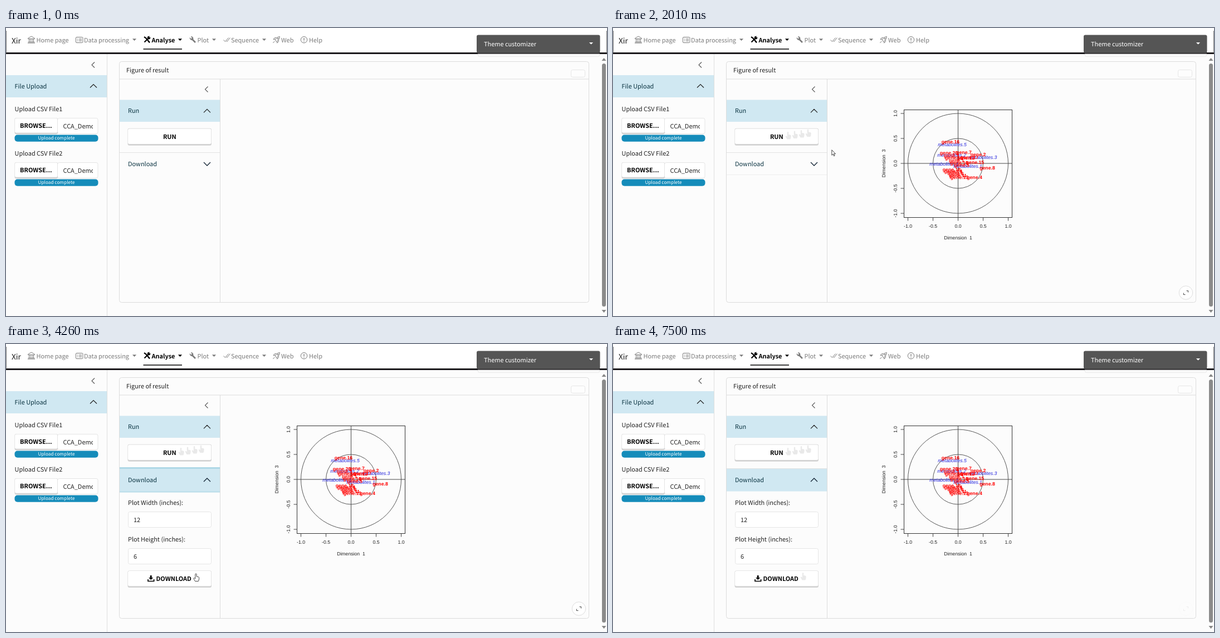
Recreate the animation shown at these times as an HTML page. Size 1079 by 519 pixels, loop 7.6 s.

```html
<!DOCTYPE html>
<html lang="en">
<head>
<meta charset="utf-8">
<title>Analysis dashboard</title>
<style>
  html, body { margin: 0; width: 100%; height: 100%; overflow: hidden; background: #fcfcfc; }
  svg { display: block; width: 1079px; height: 519px; }
  text {
    font: 10.95px "Noto Sans CJK SC", "Noto Sans CJK JP", "Noto Sans CJK", sans-serif;
    fill: #222; white-space: pre; text-rendering: geometricPrecision;
  }
  .bold { font-weight: 700; fill: #000; }
  .nav { fill: #7b7b7b; }
  .brand { font-size: 13.7px; }
  .light { fill: #fff; }
  .teal { fill: #0b3442; }
  .small { font-size: 8.25px; fill: #fff; }
  .mid { text-anchor: middle; }
  .plot text { font: 8.7px "Liberation Sans", Arial, sans-serif; text-anchor: middle; }
  .plot .gene { font-weight: 700; fill: #f00; }
  .plot .metabolites { font-style: italic; fill: #22d; }
</style>
</head>
<body>
<svg id="stage" viewBox="0 0 1079 519"></svg>
<script>
const LOOP = 7600;
const HAND = 'M-1.2 8V1.2a1.2 1.2 0 0 1 2.4 0V5l3 .6q1.6.4 1.5 2l-.4 3.4-1 2.5H-1.5L-4 9.2q-.7-1.2.4-1.6 1-.2 2.4 1.4z';
const ARROW = 'M0 0V9.5L2.2 7.5 3.8 11 5.3 10.3 3.7 7H6.7Z';
const BEAM = 'M-2 -5H-.6L0 -4.5L.6 -5H2M0 -4.5V4.5M-2 5H-.6L0 4.5L.6 5H2';

// Drawing helpers, each returning SVG markup
const text = (x, y, s, cls = '', more = '') => `<text x="${x}" y="${y}" class="${cls}" ${more}>${s}</text>`;
const rect = (x, y, w, h, fill, r = 0, stroke = 'none') =>
  `<rect x="${x}" y="${y}" width="${w}" height="${h}" rx="${r}" fill="${fill}" stroke="${stroke}"/>`;
const path = (d, stroke = '#333', width = 1, fill = 'none', more = '') =>
  `<path d="${d}" stroke="${stroke}" stroke-width="${width}" fill="${fill}" ${more}/>`;
const group = (id, content, more = '') => `<g id="${id}" ${more}>${content}</g>`;
const circle = (x, y, r, stroke, fill = 'none') => `<circle cx="${x}" cy="${y}" r="${r}" stroke="${stroke}" fill="${fill}"/>`;
const caret = (x, y, color) => path(`M${x - 3.6} ${y - 1.8}h7.2l-3.6 3.7z`, 'none', 0, color);
const chevronUp = (x, y) => path(`M${x - 6} ${y + 3}l6 -6 6 6`, '#222', 1.2);
const chevronLeft = (x, y) => path(`M${x + 2.5} ${y - 5}l-5 5 5 5`, '#555', 1.1);
const button = (x, y, w, h) =>
  rect(x, y, w, h, '#d3d3d3', 3) + rect(x + .6, y + .6, w - 1.2, h - 3.4, '#fff', 2.5);
const input = (y, value) => rect(219.5, y, 149, 28, '#fff', 3, '#e6e6e6') + text(229, y + 18.3, value);

function navigation() {
  const gray = '#7b7b7b';
  const item = (x, label, caretX) => text(x, 25.5, label, 'nav') + (caretX ? caret(caretX, 21, gray) : '');
  return rect(0, 0, 1079, 45, '#fff') + rect(0, 44, 1079, 3, '#1c1a1d')
    + path('M.5 5V45M1078.5 5V45', '#555', .8)
    + text(10, 27.5, 'Xir', 'brand')
    + item(54.5, 'Home page') + item(140, 'Data processing', 230.5) + item(343.5, 'Plot', 373.5)
    + item(404, 'Sequence', 463.5) + item(494, 'Web') + item(544, 'Help')
    + text(261.5, 25.5, 'Analyse', 'bold') + caret(312.5, 21, '#000') + rect(246.5, 37.2, 69.5, 1.5, '#000')
    // bank, list, crossed tools, wrench, double check, rocket, info
    + path('M39.5 18.5L45.5 15L51.5 18.5V19.5H39.5ZM41.5 20V25M44 20V25M47 20V25M49.5 20V25M39.5 25.5H51.5M39 27.2H52', gray)
    + rect(125.5, 16.5, 12.5, 10, 'none', 1.5, gray)
    + path('M128 19.3h1.5M131 19.3h5M128 21.5h1.5M131 21.5h5M128 23.7h1.5M131 23.7h5', gray, .9)
    + path('M248 16l3 2 6.5 7.5M257.5 16.5l-9 9', '#000', 2.2)
    + path('M254.5 18a2.8 2.8 0 0 1 3 -2.5M258.5 17a2.8 2.8 0 0 1 -3 2.5M255 23l3 3.5', '#000', 2)
    + path('M334 20l6 6', gray, 2.6)
    + path('M330 17.5l2.3 2.2 2 -2 -2.3 -2.2q3.2 -.6 4 2.5t-2.3 3.6q-3.4 0 -3.7 -4.1z', gray, .7, gray)
    + path('M390.5 21.5l3 3 6 -7M395.5 23.5l1.3 1 5.5 -7', gray)
    + path('M483 22q2.5 -6 8.5 -6.5q0 5.5 -6 9zM483.5 20l-3.5 .5 2.5 -3 3 -.3M487 24l-.5 3 2.7 -2.3 .3 -3M482 24l-2.5 3', gray)
    + circle(488, 19, 1.1, gray)
    + circle(535, 21.2, 5.7, gray) + path('M535 18V22.2M535 23.4V24.7', gray, 1.3)
    + path('M847 47v1.5q0 3 3 3H1063q3 0 3 -3V47z', '#ebebeb', 1, '#fafafa')
    + rect(845, 12.5, 221.5, 32.5, '#555', 3) + text(858, 32.5, 'Theme customizer', 'light')
    + caret(1050.5, 27.7, '#fff');
}

function upload(y, label) {
  return text(15.5, y + 4.3, label)
    + rect(92.5, y + 16.5, 72.5, 28, '#fff', 3, '#e4e4e4')
    + button(15.5, y + 16, 77.5, 29.5)
    + text(25, y + 34, 'BROWSE...', 'bold')
    + `<svg x="94" y="${y + 20}" width="62" height="24">${text(8.5, 15.2, 'CCA_Demo')}</svg>`
    + rect(15.5, y + 46.5, 150, 12.3, '#158cba', 5)
    + text(90.5, y + 55.3, 'Upload complete', 'small mid');
}

function sidebar() {
  return path('M181.5 47V519', '#dedede') + chevronLeft(156.5, 66.5)
    + rect(0, 85, 181, 40, '#d0e8f2') + text(15.5, 109, 'File Upload', 'teal') + chevronUp(157, 104.5)
    + upload(146, 'Upload CSV File1') + upload(226, 'Upload CSV File2');
}

function scrollbar() {
  return rect(1070, 64, 7, 438, '#8b8b8b', 3.5)
    + path('M1069.5 59l4 -5 4 5zM1069.5 508l4 5 4 -5z', 'none', 0, '#858585');
}

function downloadForm() {
  return text(219, 290.3, 'Plot Width (inches):') + input(302.5, '12')
    + text(219, 356.3, 'Plot Height (inches):') + input(368.5, '6')
    + button(218.5, 408.5, 150.5, 30.5)
    + path('M258.8 417h2.8v4h2.7l-4.1 4 -4.1 -4h2.7z', 'none', 0, '#000')
    + path('M255 424v3.5h10.6V424', '#000', 1.7)
    + text(269.5, 426.8, 'DOWNLOAD', 'bold');
}

function card() {
  return rect(203.5, 60.5, 843, 434, '#fcfcfc', 4, '#dcdcdc')
    + path('M204 92H1046M384.5 92V494', '#dcdcdc')
    + rect(1014.5, 75.5, 25, 13, '#fdfdfd', 3, '#e6e6e6')
    + text(216, 80, 'Figure of result')
    + chevronLeft(360, 110.5)
    + rect(204, 129.5, 180, 39.5, '#d0e8f2') + text(219, 153, 'Run', 'teal') + chevronUp(361, 149.3)
    + group('runButton', '') + path('M204 224.5H384', '#e2e2e2')
    + group('closedLine', path('M204 264.5H384', '#eee'))
    + group('openHeader', rect(204, 225, 180, 40.5, '#d0e8f2'))
    + group('focusRing', rect(204, 222, 180, 3, '#aed8e6') + rect(204, 265, 180, 2.6, '#bfe0eb'))
    + text(219, 249.3, 'Download', 'teal')
    + group('chevron', path('M-6 -3l6 6 6 -6', '#123', 1.3))
    + '<clipPath id="fold"><rect id="foldRect" x="204" y="266" width="180" height="0"/></clipPath>'
    + group('form', downloadForm(), 'clip-path="url(#fold)"')
    + group('spinner', path('M350.5 -2.5l2.5 -3 2.5 3zM350.5 3l2.5 3 2.5 -3z', 'none', 0, '#777'))
    + group('expand', circle(1028.5, 477, 12.2, '#dedede', '#fff')
      + path('M1029.5 473.5h3v3M1027.5 480.5h-3v-3', '#555', 1.1));
}

function plot() {
  const upright = (x, y, s) => text(0, 0, s, '', `transform="translate(${x} ${y}) rotate(-90)"`);
  // A diagonal run of labels, one step apart
  const run = (cls, numbers, x, y, dx = 0, dy = 0) =>
    numbers.map((n, i) => text(x + i * dx, y + i * dy, `${cls}.${n}`, cls)).join('');

  let out = rect(522.5, 147.5, 194, 194, 'none', 0, '#333')
    + path('M522.5 244H716.5M619.5 147.5V341.5', '#333', .9)
    + circle(619.5, 244, 90, '#555') + circle(619.5, 244, 45, '#555');
  for (let v = -1; v <= 1; v += .5) {
    const x = 619.5 + 90 * v, y = 244 - 90 * v, label = v.toFixed(1);
    out += path(`M${x} 341.5v6M522.5 ${y}h-6`, '#444') + text(x, 360, label) + upright(510, y, label);
  }
  return out + text(619.5, 381, 'Dimension  1') + upright(489, 244, 'Dimension  3')
    + run('metabolites', [5], 609, 213) + run('metabolites', [2, 3], 608, 231.5, 55.5, 4.5)
    + run('metabolites', [4, 1], 594, 247.5, 43, 4.5)
    + run('gene', [16], 606, 208)
    + run('gene', [20, 3, 19, 1, 10, 5], 603, 228.3, 4.6, 4.4)
    + run('gene', [7, 17, 15], 630, 227, 10, 9)
    + run('gene', [2, 8], 655.5, 231, 16.5, 24)
    + run('gene', [18, 14, 9, 6, 11, 13], 608, 258, 2.8, 2.7)
    + run('gene', [12, 4], 633, 237, 16, 34.5);
}

// Faint pointer shapes left behind on the two buttons
const trail = (x, y) => path(HAND, 'none', 0, '#e9e9e9', `transform="translate(${x} ${y})"`);

document.getElementById('stage').innerHTML = rect(0, 0, 1079, 519, '#fcfcfc')
  + sidebar() + navigation() + scrollbar() + card()
  + group('plot', plot(), 'class="plot"')
  + group('runTrail', [0, 1, 2, 3].map(i => trail(314 + 12 * i, 187 - 1.5 * i)).join(''))
  + group('downloadTrail', trail(341, 412))
  + group('cursor', path('', '#333', .9, '#fff'));

const el = id => document.getElementById(id);
const ramp = (t, start, length) => Math.min(1, Math.max(0, (t - start) / length));
const smooth = p => p * p * (3 - 2 * p);
const linear = p => p;
const show = (id, amount) => el(id).setAttribute('opacity', +amount);

// Each leg is a quadratic curve from where the previous one ended
const entry = [640, -14];
const legs = [
  { from: 230, to: 840, via: [520, 170], end: [294, 195] },
  { from: 1730, to: 2480, via: [515, 240], end: [327, 248] },
  { from: 2800, to: 3790, via: [312, 330], end: [341, 414] },
  { from: 4540, to: 5300, via: [1022, 353], end: [930, 83] },
  { from: 5340, to: 6090, via: [890, 85], end: [1000, 11] },
  { from: 6140, to: 6880, via: [791, -6], end: [714, -14], ease: linear },
];

function pointerAt(t) {
  let point = entry;
  for (const { from, to, via, end, ease = smooth } of legs) {
    const p = ease(ramp(t, from, to - from)), q = 1 - p;
    point = point.map((v, i) => q * q * v + 2 * q * p * via[i] + p * p * end[i]);
    if (t < to) break;
  }
  return point;
}

function render(t) {
  const [x, y] = pointerAt(t);
  const inside = (top, bottom) => x > 219 && x < 369 && y > top && y < bottom;
  const open = t >= 2680;
  const overRun = inside(181, 212);
  const overInput = open && (inside(302, 331) || inside(368, 397));
  const overHand = overRun || inside(224, 265) || (open && inside(408, 439));

  el('cursor').firstChild.setAttribute('d', overInput ? BEAM : overHand ? HAND : ARROW);
  el('cursor').setAttribute('transform', `translate(${x} ${y})`);

  const press = t >= 1310 && t < 1400 ? 1.4 : overRun ? .7 : 0;
  el('runButton').innerHTML = button(218.5, 180.8 + press, 150.5, 31 - press)
    + text(293.8, 199.6 + press * .7, 'RUN', 'bold mid');

  show('closedLine', t >= 620 && !open);
  show('openHeader', ramp(t, 2720, 150));
  show('focusRing', ramp(t, 2640, 150) * open * (1 - ramp(t, 7400, 95)));
  el('chevron').setAttribute('transform', `translate(361 245) rotate(${-180 * smooth(ramp(t, 2685, 200))})`);
  el('foldRect').setAttribute('height', 184 * smooth(ramp(t, 2680, 350) ** .7));

  show('spinner', overInput);
  el('spinner').setAttribute('transform', `translate(0 ${y < 340 ? 316.5 : 382.5})`);
  show('expand', ramp(t, 320, 130) * (1 - .92 * ramp(t, 7390, 110)));
  show('plot', t >= 1500);
  show('runTrail', t >= 720);
  show('downloadTrail', t >= 4580);
}

const start = performance.now();
function frame() {
  render((performance.now() - start) % LOOP);
  requestAnimationFrame(frame);
}
frame();
</script>
</body>
</html>
```
